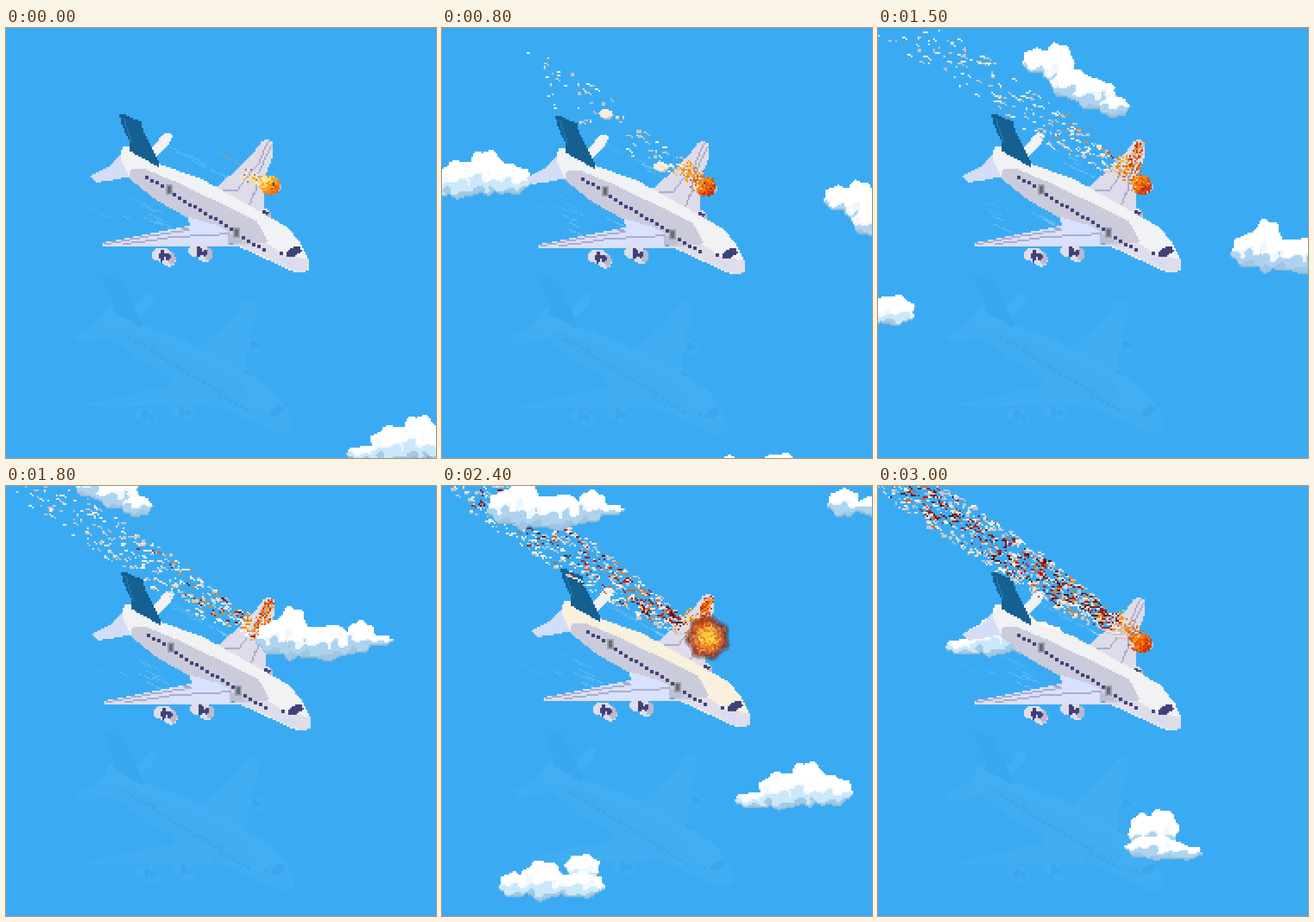
Animation of 748x748 px, one loop 3.1 s. Source, as an HTML page with a canvas:

```html
<!DOCTYPE html>
<html lang="en">
<head>
<meta charset="utf-8">
<title>Falling plane</title>
<style>
html, body { margin: 0; width: 100%; height: 100%; overflow: hidden; background: #3aabf3; }
canvas { display: block; width: 100vw; height: 100vh; image-rendering: pixelated; }
</style>
</head>
<body>
<canvas id="stage" width="250" height="250"></canvas>
<script>
const SIZE = 250, K = SIZE / 748, STEP = 100, STEPS = 31;
const ctx = document.getElementById('stage').getContext('2d');
const clamp = (v, lo, hi) => Math.max(lo, Math.min(hi, v));
const pick = (list, v) => list[clamp(Math.floor(v), 0, list.length - 1)];

function layer() {
  const c = document.createElement('canvas');
  c.width = c.height = SIZE;
  return c.getContext('2d');
}

function random(seed) {
  let a = seed * 7919 + 17;
  return () => {
    a = (a + 0x6D2B79F5) | 0;
    let t = Math.imul(a ^ (a >>> 15), 1 | a);
    t = (t + Math.imul(t ^ (t >>> 7), 61 | t)) ^ t;
    return ((t ^ (t >>> 14)) >>> 0) / 4294967296;
  };
}

function dot(g, x, y, color, w = 1, h = 1) {
  g.fillStyle = color;
  g.fillRect(Math.round(x), Math.round(y), w, h);
}

// Hard-edged polygon fill on the coarse grid; points are in stage units.
function poly(g, pts, color) {
  const p = [];
  for (let i = 0; i < pts.length; i += 2) p.push([pts[i] * K, pts[i + 1] * K]);
  const ys = p.map(q => q[1]);
  for (let y = Math.floor(Math.min(...ys)); y < Math.max(...ys); y++) {
    const cy = y + 0.5, xs = [];
    p.forEach((a, i) => {
      const b = p[(i + 1) % p.length];
      if ((a[1] <= cy) !== (b[1] <= cy)) xs.push(a[0] + (cy - a[1]) / (b[1] - a[1]) * (b[0] - a[0]));
    });
    xs.sort((a, b) => a - b);
    for (let i = 0; i + 1 < xs.length; i += 2) {
      const l = Math.round(xs[i]), r = Math.round(xs[i + 1]);
      if (r > l) dot(g, l, y, color, r - l);
    }
  }
}

function oval(g, x, y, rx, ry, color) {
  const pts = [];
  for (let a = 0; a < 6.28; a += 0.4) pts.push(x + rx * Math.cos(a), y + ry * Math.sin(a));
  poly(g, pts, color);
}

function line(g, pts, color, thick = 1) {
  for (let i = 0; i + 3 < pts.length; i += 2) {
    const x = pts[i] * K, y = pts[i + 1] * K;
    const dx = pts[i + 2] * K - x, dy = pts[i + 3] * K - y;
    const n = Math.ceil(Math.max(Math.abs(dx), Math.abs(dy))) || 1;
    for (let j = 0; j <= n; j++) dot(g, Math.floor(x + dx * j / n), Math.floor(y + dy * j / n), color, 1, thick);
  }
}

// ---- plane ----
const NAVY = '#41417a', SEAM = '#aeabc6', LILAC = '#e0ddea', ICE = '#d3ddf5', CREAM = '#f9f0de';

function engine(g, x, y, s) {
  oval(g, x - 4 * s, y - 3 * s, 17 * s, 12 * s, LILAC);
  oval(g, x + 9 * s, y + 5 * s, 13 * s, 13 * s, LILAC);
  oval(g, x + 14 * s, y + 4 * s, 7 * s, 11 * s, '#b9b8cd');
  oval(g, x - 2 * s, y - 1 * s, 5 * s, 10 * s, NAVY);
  oval(g, x + 8 * s, y + 1 * s, 4 * s, 6 * s, NAVY);
}

function makePlane(roof, edge) {
  const g = layer();
  // far wing and tail planes
  poly(g, [360, 282, 402, 246, 430, 218, 445, 197, 455, 193, 465, 200, 463, 224, 450, 262, 447, 322, 395, 302], '#dedcea');
  line(g, [455, 200, 440, 234, 402, 282, 377, 284], SEAM);
  line(g, [461, 204, 436, 262, 434, 282, 422, 312], SEAM);
  engine(g, 461, 273, 0.8);
  engine(g, 450, 322, 0.55);
  poly(g, [247, 214, 262, 200, 275, 184, 285, 181, 290, 188, 284, 202, 258, 230], '#f0f2f3');
  poly(g, [147, 258, 180, 240, 203, 219, 225, 240, 215, 259, 190, 264, 158, 269], ICE);
  // fuselage
  const top = [205, 207, 216, 207, 265, 236, 340, 263, 400, 296, 490, 347, 512, 374, 526, 402];
  poly(g, [199, 228, 199, 215, ...top, 526, 421, 500, 424, 400, 378, 320, 331, 262, 299, 215, 260], roof);
  if (edge) line(g, top, CREAM, edge);
  poly(g, [215, 247, 243, 246, 300, 270, 400, 318, 436, 336, 454, 368, 450, 390, 400, 379, 320, 332, 262, 300, 215, 262], '#cbcbdb');
  poly(g, [454, 374, 480, 393, 526, 402, 526, 421, 519, 424, 500, 423, 448, 397, 400, 378], LILAC);
  poly(g, [468, 394, 506, 409, 500, 416, 480, 407], '#d6dcf2');
  // near wing
  poly(g, [167, 374, 240, 360, 320, 344, 316, 328, 365, 343, 392, 357, 386, 377, 280, 380, 170, 381], '#d8e1fd');
  poly(g, [386, 357, 402, 360, 412, 372, 385, 376], '#bebfd0');
  line(g, [170, 379, 400, 377], LILAC);
  line(g, [172, 376, 250, 362, 320, 351, 308, 348], SEAM);
  line(g, [205, 376, 290, 364, 386, 358], SEAM);
  engine(g, 274, 397, 1);
  engine(g, 338, 390, 1);
  // windows and doors
  const pane = (x, y) => dot(g, x * K - 1, y * K - 1, NAVY, 2, 2);
  const row = (x, y, n) => { for (let i = 0; i < n; i++) pane(x + i * 3 / K, y + i * 5.3); };
  const door = (x, y) => { dot(g, x * K - 2, y * K - 3, '#9aa0a8', 4, 6); dot(g, x * K - 1, y * K - 2, '#646c74', 2, 4); };
  row(245, 260, 4);
  row(292, 291, 12);
  row(414, 365, 5);
  door(283, 280);
  door(401, 357);
  pane(480, 391);
  poly(g, [488, 390, 494, 383, 511, 379, 514, 388, 501, 397, 488, 397], NAVY);
  // fin
  poly(g, [198, 149, 206, 149, 235, 163, 241, 184, 266, 232, 265, 242, 217, 215, 214, 196, 200, 163], '#155f91');
  line(g, [206, 158, 212, 178, 219, 198], '#1c73ab');
  return g.canvas;
}

const calm = makePlane('#f0f2f3'), lit = makePlane(CREAM);
const fading = makePlane('#f0f2f3', 4), faded = makePlane('#f0f2f3', 1);

// ---- clouds: lumps [x, y, rx, ry] with wavy rims ----
const shapes = {
  spur: [[24, 32, 25, 22], [60, 38, 28, 37], [84, 72, 36, 26], [124, 90, 38, 26], [158, 112, 26, 18]],
  long: [[34, 54, 34, 30], [62, 46, 28, 46], [118, 62, 62, 30], [182, 52, 24, 28], [210, 58, 28, 10]],
  twin: [[28, 28, 28, 24], [78, 34, 30, 16], [118, 26, 37, 26]],
  hill: [[36, 66, 37, 14], [82, 50, 42, 32], [126, 38, 34, 38], [166, 50, 38, 26]],
  hook: [[28, 56, 26, 22], [78, 48, 38, 34], [148, 24, 30, 22], [142, 56, 44, 22]],
  mound: [[40, 38, 24, 32], [72, 34, 30, 34], [60, 66, 50, 20], [104, 74, 40, 13]]
};
const FROST = ['#ffffff', '#f2f8fc', '#cbe8fa', '#a3cae5'];
const STEEL = ['#ffffff', '#eef7fd', '#add3ef', '#a0c6e1'];

function makeCloud(lumps, tones) {
  const g = layer();
  const depth = Math.max(...lumps.map(l => l[1] + l[3]));
  const lumpAt = (x, y) => lumps.findLast(([cx, cy, rx, ry], i) => {
    const u = (x / K - cx) / rx, v = (y / K - cy) / ry;
    return Math.hypot(u, v) < 1 + 0.07 * Math.sin(Math.atan2(v, u) * 7 + i * 2);
  });
  for (let y = 0; y < 60; y++) for (let x = 0; x < 90; x++) {
    const l = lumpAt(x, y);
    if (!l) continue;
    const local = (y / K - l[1]) / l[3] * 0.5 + 0.5;
    const v = local * 0.65 + y / K / depth * 0.35 + 0.13 * Math.sin(x * 0.5 + y * 0.35) * Math.sin(y * 0.4 - x * 0.2);
    dot(g, x, y, lumpAt(x, y + 1) ? tones[v < 0.52 ? 0 : v < 0.6 ? 1 : v < 0.84 ? 2 : 3] : '#93bcd7');
  }
  return g.canvas;
}

// keys: step, x, y
const cloud = (shape, tones, front, ...keys) => ({ img: makeCloud(shapes[shape], tones), front, keys });
const clouds = [
  cloud('hill', FROST, false, [0, 593, 672], [8, -50, 211]),
  cloud('spur', STEEL, false, [8, 663, 263], [12, 436, 126], [18, 68, -79]),
  cloud('twin', FROST, true, [8, 470, 740], [12, 148, 583]),
  cloud('long', STEEL, true, [18, 435, 210], [22, 197, 48], [26, -40, -85]),
  cloud('twin', STEEL, true, [22, 722, 36], [26, 617, -38]),
  cloud('hill', FROST, false, [22, 634, 549], [26, 383, 409], [30, 117, 212]),
  cloud('hook', FROST, true, [22, 193, 694], [26, 0, 580]),
  cloud('mound', STEEL, true, [26, 658, 738], [30, 418, 561])
];

function drawClouds(n, front) {
  for (const { img, keys, front: near } of clouds) {
    if (near !== front) continue;
    const i = keys.length > 2 && n > keys[1][0] ? 1 : 0;
    const [a, b] = [keys[i], keys[i + 1]], u = (n - a[0]) / (b[0] - a[0]);
    const at = j => Math.round((a[j] + (b[j] - a[j]) * u) * K);
    ctx.drawImage(img, at(1), at(2));
  }
}

// ---- debris ----
const PALE = ['#f6efe2', '#fdf8ee', '#f1e6d8', '#c8c6c6'];
const HOT = ['#a4161a', '#74120f', '#b01c14', '#5a1012', '#dd5a14'];
const bits = [];
const roll = random(4);
for (let n = 2; n < STEPS; n++) {
  const heat = clamp((n - 11) * 0.035, 0, 0.42);
  for (let i = 0; i < 9 + 0.16 * n * n; i++) {
    const side = roll() * 2 - 1;
    bits.push({
      side, born: n + roll(), speed: 0.88 + roll() * 0.24, life: 8.5 + roll() * 3,
      color: pick(roll() < heat * 1.4 * (1 - side * side) ? HOT : PALE, roll() * 5),
      w: 1 + Math.floor(roll() * 2.3), kind: roll()
    });
  }
}

function drawDebris(n) {
  for (const b of bits) {
    const a = n - b.born;
    if (a < 0.3 || a > b.life) continue;
    const off = b.side * Math.min(21, 7 + a * 4.5);
    const x = 145 - 15.5 * b.speed * a + off * 0.35, y = 84 - 10 * b.speed * a + off * 0.9;
    const color = n > 9 && a < 3 && b.kind > 0.86 ? '#f08418' : b.color;
    dot(ctx, x, y, color, b.w);
    if (b.kind < 0.35) dot(ctx, x + b.w, y + 1, color);
    else if (b.kind < 0.5) dot(ctx, x, y + 1, '#cdc6c0', b.w);
  }
  const rock = (x, y) => {
    oval(ctx, x + 2, y + 3, 12, 7, '#cfc4b8');
    oval(ctx, x, y, 12, 7, '#f8eee0');
  };
  const u = n - 8;
  if (n > 5 && n < 11) rock(285 - u * 45, 148 - u * 30);
  if (n > 7 && n < 15) rock(380 - u * 38, 241 - u * 29);
}

// ---- fire, blast, wind ----
const FLAME = ['#fff3c0', '#ffdc68', '#f9a52a', '#f48412', '#ea5608', '#c93208'];
const BLAST = ['#fff6a4', '#ffe85a', '#fbc63a', '#f18b24', '#d35120', '#a3321e', '#6d3026', '#4a2b2c'];

function drawFire(n, dx, dy) {
  const r = random(n + 50), big = Math.min(1, n / 10);
  const hx = 153 + dx, hy = 91 + dy;
  for (let i = 0; i < 90 + 70 * big; i++) {
    const d = r() ** 1.3, s = (r() + r() - 1) * (5 + 2.5 * big);
    dot(ctx, hx - d * 16 + s * 0.6, hy - d * (7 + 8 * big) - s * 0.7,
      r() < 0.08 ? '#8b7b79' : pick(FLAME, (1 - d) * 2 + big * 2 + r() * 2.4 - 0.8));
  }
  for (let y = -5; y <= 6; y++) for (let x = -6; x <= 5; x++) {
    if (x * x / 34 + y * y / 32 > 1 || r() < 0.1) continue;
    dot(ctx, hx + x, hy + y, pick(FLAME, 1.8 + big * 1.7 + (x + y) * 0.2 + r() * 1.8));
  }
  // flames along the wing
  if (n > 9 && n < 28) for (let i = 0; i < n * 6; i++) {
    const d = r(), w = (r() - 0.5) * (9 - d * 4);
    dot(ctx, 147 + d * 5 + w + dx, 82 - d * 16 + dy, pick(FLAME, 2 + r() * 4));
  }
  if (n < 3) line(ctx, [372 - n * 45, 217 - n * 27, 405 - n * 45, 237 - n * 27], '#68a9b4');
}

function drawBlast(n, dx, dy) {
  if (n < 20 || n > 27) return;
  const r = random(n + 90), R = 14 * Math.sin(Math.PI * (n - 19) / 9) ** 0.4;
  const cool = Math.max(0, n - 22) * 0.95;
  for (let y = -14; y <= 14; y++) for (let x = -14; x <= 14; x++) {
    const a = Math.atan2(y, x), d = Math.hypot(x, y) / (R * (0.94 + 0.06 * Math.sin(a * 7 + n)));
    if (d > 1) continue;
    ctx.globalAlpha = Math.min(1, (1 - d) * 4 + 0.2) * (1 - r() * cool * 0.12);
    dot(ctx, 151 + dx + x, 90 + dy + y, r() < 0.06 ? '#8a7140' : pick(BLAST, d * d * 5.5 + cool + r() * 1.8 - 0.6));
  }
  ctx.globalAlpha = 1;
}

function drawWind(n) {
  const r = random(12);
  for (let i = 0; i < 20; i++) {
    const low = i % 2, u = (r() + n * 0.17) % 1, s = r(), len = 4 + r() * 9;
    const x = (low ? 74 + s * 26 : 112 + s * 18) - u * (low ? 38 : 30);
    const y = (low ? 118 - s * 6 : 82 + s * 7) - u * (low ? 19 : 22);
    ctx.globalAlpha = 0.28 * (1 - u);
    for (let j = 0; j < len; j++) if ((j + i) % 7) dot(ctx, x + j, Math.floor(y + j * 0.45), '#c8ecff');
  }
  ctx.globalAlpha = 1;
}

// ---- timeline ----
// A light rattle at first, then a swelling and fading jolt around the blast.
function shake(n) {
  if (n < 17) return [0, n % 3 === 2 ? 1 : 0];
  const amp = 4 * Math.sin(Math.PI * (n - 17) / 13), turn = Math.PI / 2 + (n - 22) * 2.04;
  return [Math.round(amp * Math.cos(turn)), Math.round(amp * Math.sin(turn))];
}

function draw(n) {
  const [dx, dy] = shake(n);
  ctx.fillStyle = '#3aabf3';
  ctx.fillRect(0, 0, SIZE, SIZE);
  ctx.globalAlpha = 0.045;
  ctx.drawImage(calm, dx - 10, dy + 93);
  ctx.globalAlpha = 1;
  drawClouds(n, false);
  drawWind(n);
  ctx.drawImage(n < 20 ? calm : n < 25 ? lit : n < 28 ? fading : faded, dx, dy);
  drawFire(n, dx, dy);
  drawDebris(n);
  drawBlast(n, dx, dy);
  drawClouds(n, true);
}

const start = performance.now();
let shown = -1;
function tick() {
  const n = Math.floor((performance.now() - start) / STEP) % STEPS;
  if (n !== shown) draw(shown = n);
  requestAnimationFrame(tick);
}
tick();
</script>
</body>
</html>
```
